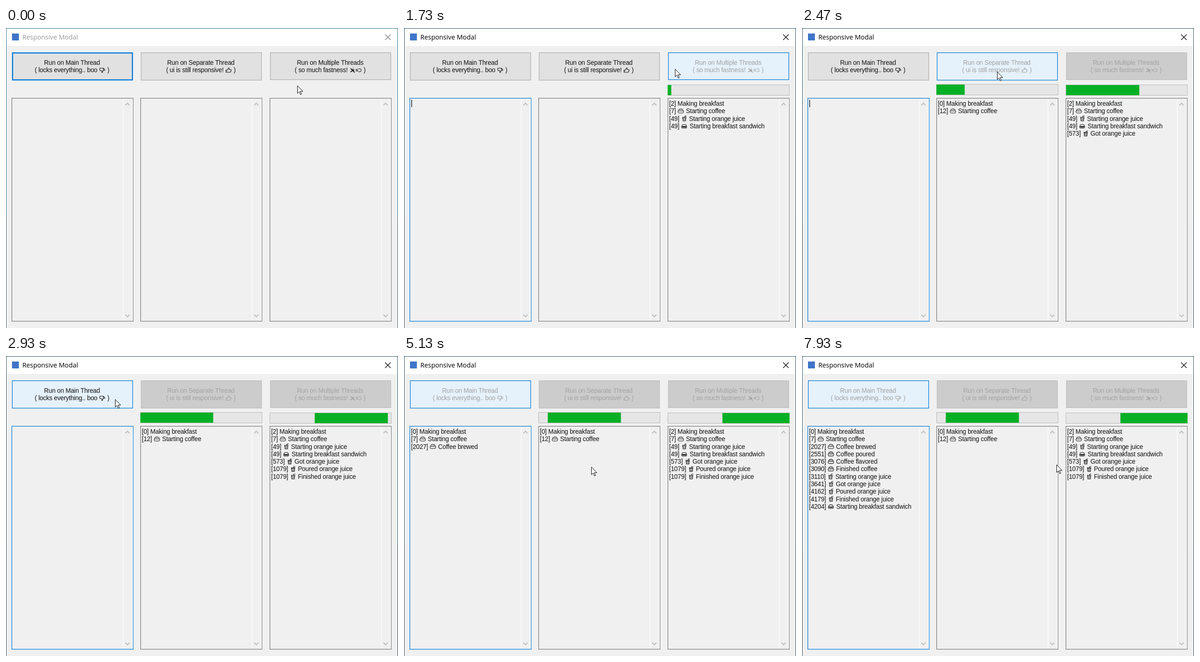
An HTML page with a canvas for the animation above (8000 ms loop, 852x652 px).

```html
<!DOCTYPE html>
<html lang="en">
<head>
<meta charset="utf-8">
<title>Responsive Modal</title>
<style>
  html, body { margin: 0; width: 100%; height: 100%; overflow: hidden; background: #f0f0f0; }
  canvas { display: block; }
</style>
</head>
<body>
<canvas id="stage" width="852" height="652"></canvas>
<script>
const ctx = document.getElementById('stage').getContext('2d');

const LOOP = 8000;
const FPS = 15;
const ACTIVATED = 1460;
const FROZEN = 3035;
const BAR_SPEED = 0.2075;
const BAR_CHUNK = 159;
const LINE_HEIGHT = 16.28;
const BLUE = '#0078d7';
const UI_FONT = '13.75px "Liberation Sans", Arial, sans-serif';
const TITLE_FONT = '14.3px "Open Sans", "Noto Sans", sans-serif';

// Icons sit in a 14 x 12 box, 11 px above the baseline.
const icons = {
  coffee: { width: 14.7, path: 'M2 5.5C2 2.5 4.5 1.5 7 1.5S12 2.5 12 5.5C14 6 13.5 10 11 10.5H3C.5 10 .5 6 2 5.5ZM2.5 6H11.5M4.5 3.5H6M8 3.5H9.5' },
  juice: { width: 14, path: 'M3.5 3.5H11L10 11.5H4.5ZM3.5 5.5H11M7.5 3.5L9 .8H12M6 7.5V10M8.5 7.5V10' },
  sandwich: { width: 15.2, path: 'M2.5 7V5C2.5 1.8 11.5 1.8 11.5 5V7ZM1.5 7H12.5V9C12.5 10 11.5 10.5 11 10.5H3C2 10.5 1.5 9.5 1.5 9ZM3 8.3H11' },
  up: { width: 14.5, path: 'M1.5 6H4.5L7 1.5C8.5 1 8.8 2 8 5H12C13 5 13 6.5 12 7C12.8 8 12.3 9 11.5 9C12 10 11 11 10 11H1.5ZM4.5 8.5H1.5' },
  down: { width: 14.5, path: 'M2 2H9.5L12.5 5V7H9L7.5 11.5H6L6.3 7.5H2.5C1.5 7 1.5 6 2 5.5C1 4.5 1.3 3.5 2 3.5ZM9.5 2V7' },
  run: { width: 13, stroke: 1.9, path: 'M8 2H9M3 2.5L9.5 9.5M5 5L11 6.5M6 8L2.5 10.5M8.5 9L12 11' },
  dash: { width: 14.5, path: 'M1 4.5H6M.5 6.5H6M1.5 8.5H6M7 4C9 2 13 3 13 6.5S9 11 7 9' },
};
for (const icon of Object.values(icons)) icon.shape = new Path2D(icon.path);

const arrow = new Path2D('M.5 .5V17L4.4 13.4 7 19.8 9.4 18.8 6.8 12.6H12.2Z');

const columns = [
  {
    x: 12, top: 53, bottom: 114, press: 2960, release: FROZEN, run: 3070,
    label: ['Run on Main Thread', '( locks everything.. boo {down} )'],
    log: [
      [0, 'Making breakfast'], [7, '{coffee} Starting coffee'],
      [2027, '{coffee} Coffee brewed'], [2551, '{coffee} Coffee poured'],
      [3076, '{coffee} Coffee flavored'], [3090, '{coffee} Finished coffee'],
      [3110, '{juice} Starting orange juice'], [3641, '{juice} Got orange juice'],
      [4162, '{juice} Poured orange juice'], [4179, '{juice} Finished orange juice'],
      [4204, '{sandwich} Starting breakfast sandwich'],
    ],
  },
  {
    x: 292, top: 53, bottom: 114, press: 2000, release: 2110, run: 2165, barStart: 2170, barY: 122,
    label: ['Run on Separate Thread', '( ui is still responsive! {up} )'],
    log: [[0, 'Making breakfast'], [12, '{coffee} Starting coffee']],
  },
  {
    x: 573, top: 53, bottom: 113, press: ACTIVATED, release: 1590, run: 1662, barStart: 1695, barY: 123,
    label: ['Run on Multiple Threads', '( so much fastness! {run}{dash} )'],
    log: [
      [2, 'Making breakfast'], [7, '{coffee} Starting coffee'],
      [49, '{juice} Starting orange juice'], [49, '{sandwich} Starting breakfast sandwich'],
      [573, '{juice} Got orange juice'], [1079, '{juice} Poured orange juice'],
      [1079, '{juice} Finished orange juice'],
    ],
  },
];

// Pointer track: time, x, y
const track = [
  [934, 633, 125], [1333, 603, 91], [1600, 603, 91], [1733, 589, 89], [1866, 552, 88],
  [2000, 519, 90], [2133, 516, 90], [2267, 512, 90], [2533, 395, 96], [2867, 240, 94],
  [2933, 237, 94], [3934, 237, 94], [4000, 251, 94], [4267, 335, 145], [4600, 460, 205],
  [4800, 415, 224], [4933, 407, 241], [5200, 407, 241], [5500, 470, 280], [5733, 540, 289],
  [6067, 601, 262], [6200, 606, 254], [6533, 616, 295], [6867, 632, 284], [7133, 626, 240],
  [7333, 602, 248], [7800, 602, 248], [7867, 580, 243], [7933, 553, 236],
];

function pointerAt(t) {
  const next = track.findIndex(key => key[0] > t);
  const [, x, y] = next < 0 ? track[track.length - 1] : track[0];
  if (next <= 0) return [x, y];
  const a = track[next - 1], b = track[next];
  const k = (t - a[0]) / (b[0] - a[0]);
  return [1, 2].map(i => Math.round(a[i] + (b[i] - a[i]) * k));
}

function fill(color, x, y, w, h) {
  ctx.fillStyle = color;
  ctx.fillRect(x, y, w, h);
}

function box(x, y, w, h, border, inside, line = 1.25) {
  fill(border, x, y, w, h);
  fill(inside, x + line, y + line, w - 2 * line, h - 2 * line);
}

function polyline(color, width, ...points) {
  ctx.strokeStyle = color;
  ctx.lineWidth = width;
  ctx.beginPath();
  points.forEach(([x, y]) => ctx.lineTo(x, y));
  ctx.stroke();
}

const tokens = text => text.split(/\{(\w+)\}/).map((part, i) => i % 2 ? icons[part] : part);
const tokenWidth = token => token.shape ? token.width : ctx.measureText(token).width;

function drawRich(text, x, baseline, color) {
  ctx.fillStyle = ctx.strokeStyle = color;
  for (const token of tokens(text)) {
    if (token.shape) {
      ctx.save();
      ctx.translate(x, baseline - 11);
      ctx.lineWidth = token.stroke || 1.1;
      ctx.stroke(token.shape);
      ctx.restore();
    } else {
      ctx.fillText(token, x, baseline);
    }
    x += tokenWidth(token);
  }
}

function drawCentered(text, center, baseline, color) {
  const width = tokens(text).reduce((sum, token) => sum + tokenWidth(token), 0);
  drawRich(text, center - width / 2, baseline, color);
}

function drawFrame(active) {
  fill('#f0f0f0', 0, 0, 852, 652);
  fill('#fff', 0, 0, 852, 39);
  const edge = active ? '#1c4a63' : '#26698f';
  fill(edge, 0, 0, 852, 1);
  for (const x of [0, 851]) {
    fill(edge, x, 0, 1, 412);
    fill(active ? '#2d3a42' : '#3d5361', x, 412, 1, 240);
  }
  fill('#3f74c8', 13, 12, 15, 15);
  ctx.font = TITLE_FONT;
  ctx.letterSpacing = '0px';
  ctx.fillStyle = active ? '#000' : '#999';
  ctx.fillText('Responsive Modal', 35.5, 25);
  const cross = active ? '#000' : '#777';
  polyline(cross, 1.2, [824, 14], [836, 26]);
  polyline(cross, 1.2, [836, 14], [824, 26]);
}

function drawButton(col, t, [px, py]) {
  const { x, top, bottom } = col;
  const left = x + 1, width = 263;
  const disabled = t >= col.run || (col.run > FROZEN && t >= FROZEN);
  const hover = px >= left && px < left + width && py >= top && py < bottom;
  let border = '#adadad', face = '#e1e1e1', line = 1.25;
  if (t >= col.press && t < col.release) [border, face] = ['#005499', '#cce4f7'];
  else if (hover) [border, face] = [BLUE, '#e5f1fb'];
  else if (disabled) [border, face] = ['#bfbfbf', '#cccccc'];
  else if (col === columns[0] && t < ACTIVATED) [border, line] = [BLUE, 2.4];
  box(left, top, width, bottom - top, border, face, line);
  const ink = disabled ? '#a3a3a3' : '#111';
  col.label.forEach((text, i) => drawCentered(text, left + width / 2 - 1, 80 + i * LINE_HEIGHT, ink));
}

function drawBar(col, t) {
  if (!col.barStart || t < col.run) return;
  box(col.x, col.barY, 265, 24, '#bcbcbc', '#e6e6e6', 1.1);
  const right = Math.max(0, (Math.min(t, FROZEN) - col.barStart) * BAR_SPEED);
  const from = Math.max(0, right - BAR_CHUNK), to = Math.min(265, right);
  fill('#06b025', col.x + from, col.barY + 1, to - from, 22);
}

function drawLog(col, t, focused) {
  const { x } = col;
  box(x, 152, 265, 486, focused ? BLUE : '#7a7a7a', '#f0f0f0');
  fill('#fff', x + 242, 154, 1.2, 482);
  fill('#fafafa', x + 262.5, 154, 1.2, 482);
  const mid = x + 252;
  polyline('#bdbdbd', 2, [mid - 4.5, 168], [mid, 163.5], [mid + 4.5, 168]);
  polyline('#bdbdbd', 2, [mid - 4.5, 623], [mid, 627.5], [mid + 4.5, 623]);
  col.log.forEach(([ms, text], i) => {
    if (t >= col.run + ms) drawRich(`[${ms}] ${text}`, x + 3.3, 169 + i * LINE_HEIGHT, '#111');
  });
}

// Focus falls back to the first log whenever a clicked button is disabled.
function focusStart(t) {
  const [first, second, third] = columns;
  if (t >= FROZEN) return FROZEN;
  if (t >= second.run && t < first.press) return second.run;
  if (t >= third.run && t < second.press) return third.run;
  return null;
}

function draw(t) {
  const pointer = pointerAt(t);
  const hoverPoint = t < FROZEN ? pointer : pointerAt(FROZEN);
  const since = focusStart(t);
  drawFrame(t >= ACTIVATED);
  ctx.font = UI_FONT;
  ctx.letterSpacing = '-0.22px';
  columns.forEach((col, i) => {
    drawButton(col, t, hoverPoint);
    drawBar(col, t);
    drawLog(col, t, i === 0 && since !== null);
  });
  if (since !== null && t < FROZEN && (t - since) % 1060 < 530) fill('#000', 16, 156, 1.3, 16);
  ctx.save();
  ctx.translate(...pointer);
  ctx.fillStyle = '#fff';
  ctx.strokeStyle = '#000';
  ctx.lineWidth = 1;
  ctx.fill(arrow);
  ctx.stroke(arrow);
  ctx.restore();
}

const start = performance.now();
function tick() {
  const t = (performance.now() - start) % LOOP;
  draw(Math.floor((t + 4) * FPS / 1000) * 1000 / FPS % LOOP);
  requestAnimationFrame(tick);
}
tick();
</script>
</body>
</html>
```
